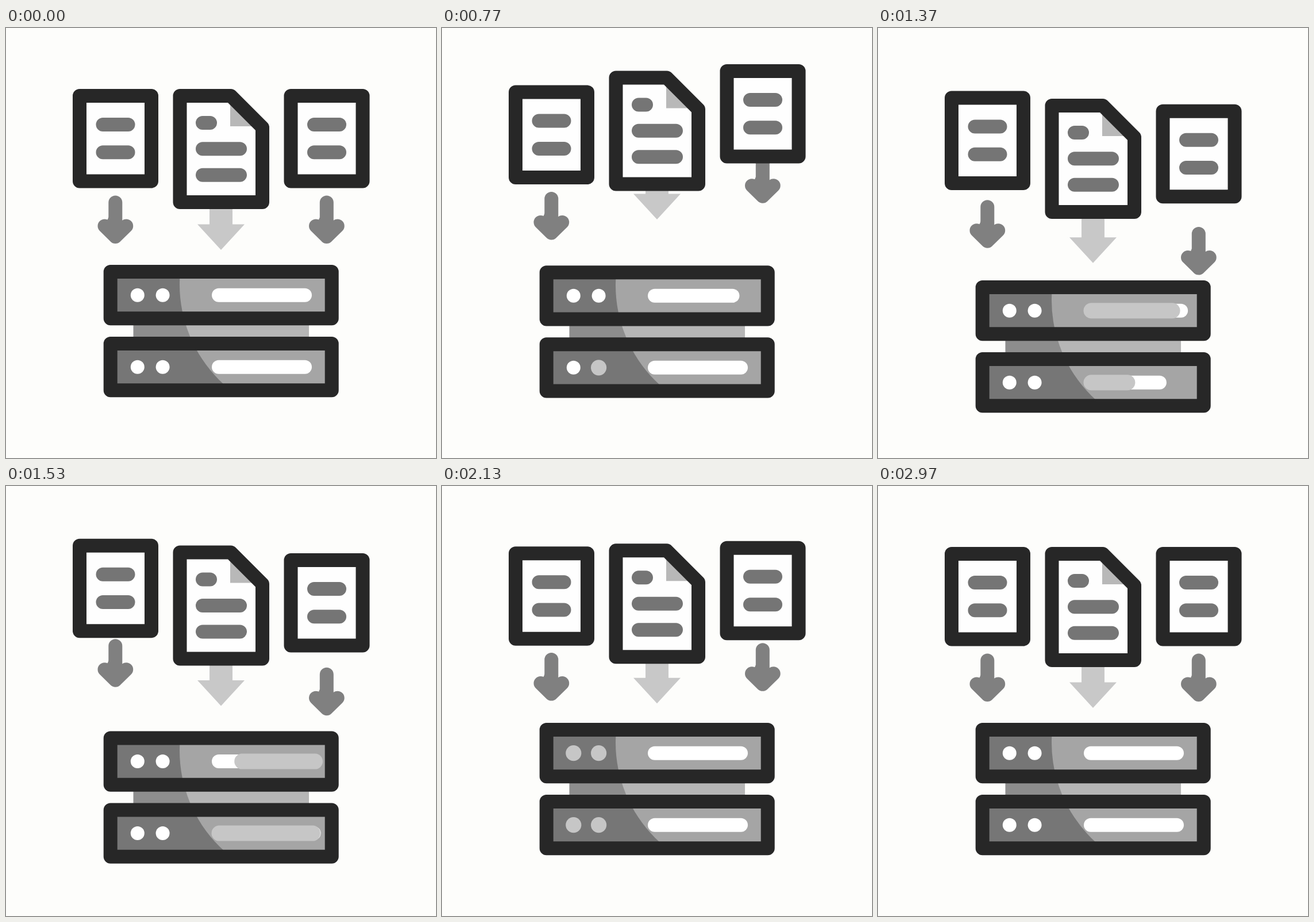
Recreate the animation shown at these times as an HTML page. Size 748 by 748 pixels, loop 3000 ms.

```html
<!DOCTYPE html>
<html lang="en">
<head>
<meta charset="utf-8">
<title>Files to server</title>
<style>
  html, body { margin: 0; width: 100%; height: 100%; overflow: hidden; background: #fdfdfb; }
  svg { display: block; width: 100%; height: 100%; }
  path, rect, use { stroke-linecap: round; stroke-linejoin: round; }
  .frame { fill: none; stroke: #272727; stroke-width: 24; }
  .paper { fill: #fefefe; }
  .text { fill: none; stroke: #757575; stroke-width: 24; }
  .arrow { fill: #808080; stroke: #808080; stroke-width: 24; }
  .white { fill: none; stroke: #fff; stroke-width: 24; }
  .pulse { fill: none; stroke: #c6c6c6; stroke-width: 27; }
</style>
</head>
<body>
<svg viewBox="0 0 748 748">
  <defs>
    <g id="page">
      <rect class="paper" x="128" y="118" width="125" height="148.5"/>
      <rect class="frame" x="128" y="118" width="125" height="148.5"/>
      <path class="text" d="M168.5 168H212.5M168.5 216.3H212.5"/>
    </g>
    <path id="arrow" class="arrow" d="M190.3 303.5V363L171.5 344.5M190.3 363L209.2 344.5"/>
    <clipPath id="shine"><circle cx="537" cy="446" r="235"/></clipPath>
  </defs>

  <g id="arrow0"><use href="#arrow"/></g>
  <path id="arrow1" fill="#c8c8c8" d="M354 290H394V341.5H415L374 386L333 341.5H354Z"/>
  <g id="arrow2"><use href="#arrow" x="367.5"/></g>

  <g id="doc0"><use href="#page"/></g>
  <g id="doc1">
    <path class="paper" d="M302.5 118H391L446 173V303H302.5Z"/>
    <path fill="#b8b8b8" d="M390 125V171H440Z"/>
    <path class="frame" d="M302.5 118H391L446 173V303H302.5Z"/>
    <path class="text" d="M342 165H355M342 210.3H407M342 255.8H407"/>
  </g>
  <g id="doc2"><use href="#page" x="367.5"/></g>

  <g id="server">
    <path fill="#8d8d8d" d="M221.5 510H527V545H221.5Z"/>
    <path fill="#767676" d="M182 424H567V505H182ZM182 549H567V630H182Z"/>
    <g clip-path="url(#shine)">
      <path fill="#b6b6b6" d="M221.5 510H527V545H221.5Z"/>
      <path fill="#a5a5a5" d="M182 424H567V505H182ZM182 549H567V630H182Z"/>
    </g>
    <rect class="frame" x="181.7" y="424" width="385" height="81.3"/>
    <rect class="frame" x="181.7" y="549" width="385" height="81.3"/>
    <g id="leds"></g>
    <path id="bar0" class="white"/>
    <path id="bar1" class="white"/>
    <path id="pulse0" class="pulse"/>
    <path id="pulse1" class="pulse"/>
  </g>
</svg>
<script>
  const LOOP = 3000;
  const ROWS = [464.7, 589.7];
  const BAR_LAG = 110;
  const $ = id => document.getElementById(id);

  // Eased value along [time, value] keys.
  function track(keys, t) {
    if (t <= keys[0][0]) return keys[0][1];
    for (let i = 1; i < keys.length; i++) {
      const [t0, a] = keys[i - 1], [t1, b] = keys[i];
      if (t < t1) {
        const p = (t - t0) / (t1 - t0);
        return a + (b - a) * p * p * (3 - 2 * p);
      }
    }
    return keys[keys.length - 1][1];
  }

  const bounce = (up, down, rebound, reboundTime) =>
    [[0, 0], [460, up], [1070, down], [reboundTime, rebound], [2200, 0]];

  const columns = [
    { delay: 0, doc: bounce(-45, 30, -19, 1640), arrow: bounce(-74, 57, -34, 1640) },
    { delay: 137, doc: bounce(-46, 27, -19.5, 1620), arrow: bounce(-75, 36, -26.5, 1620) },
    { delay: 250, doc: bounce(-45, 28, -19, 1590), arrow: bounce(-74, 57, -34, 1590) }
  ];

  const serverY = [[710, 0], [1240, 31.5], [1790, 0]];
  const barEnd = [[720, 520], [960, 395], [1450, 537], [1850, 520]];
  const pulseHead = [[1124, 371], [1452, 537.5]];
  const pulseTail = [[1424, 371], [1761, 537.5]];

  const allBlink = [2090, 2190];
  const leds = [];
  for (const y of ROWS) for (const x of [228.8, 272.6]) {
    const el = document.createElementNS("http://www.w3.org/2000/svg", "circle");
    el.setAttribute("cx", x);
    el.setAttribute("cy", y);
    $("leds").append(el);
    leds.push({ el, blinks: [allBlink] });
  }
  leds[3].blinks.push([130, 230], [720, 820]);

  const moveY = (id, y) => $(id).setAttribute("transform", `translate(0 ${y.toFixed(2)})`);
  const drawLine = (id, x0, x1, y) => $(id).setAttribute("d", x1 - x0 > 0.2 ? `M${x0} ${y}H${x1}` : "");

  function render(t) {
    columns.forEach((c, i) => {
      moveY("doc" + i, track(c.doc, t - c.delay));
      moveY("arrow" + i, track(c.arrow, t - c.delay));
    });
    moveY("server", track(serverY, t));
    ROWS.forEach((y, i) => {
      const local = t - i * BAR_LAG;
      drawLine("bar" + i, 370, track(barEnd, local), y);
      drawLine("pulse" + i, track(pulseTail, local), track(pulseHead, local), y);
    });
    for (const { el, blinks } of leds) {
      const on = blinks.some(([from, to]) => t >= from && t < to);
      el.setAttribute("r", on ? 13.6 : 12);
      el.setAttribute("fill", on ? "#c6c6c6" : "#fff");
    }
  }

  const start = performance.now();
  function tick() {
    render((performance.now() - start) % LOOP);
    requestAnimationFrame(tick);
  }
  tick();
</script>
</body>
</html>
```
